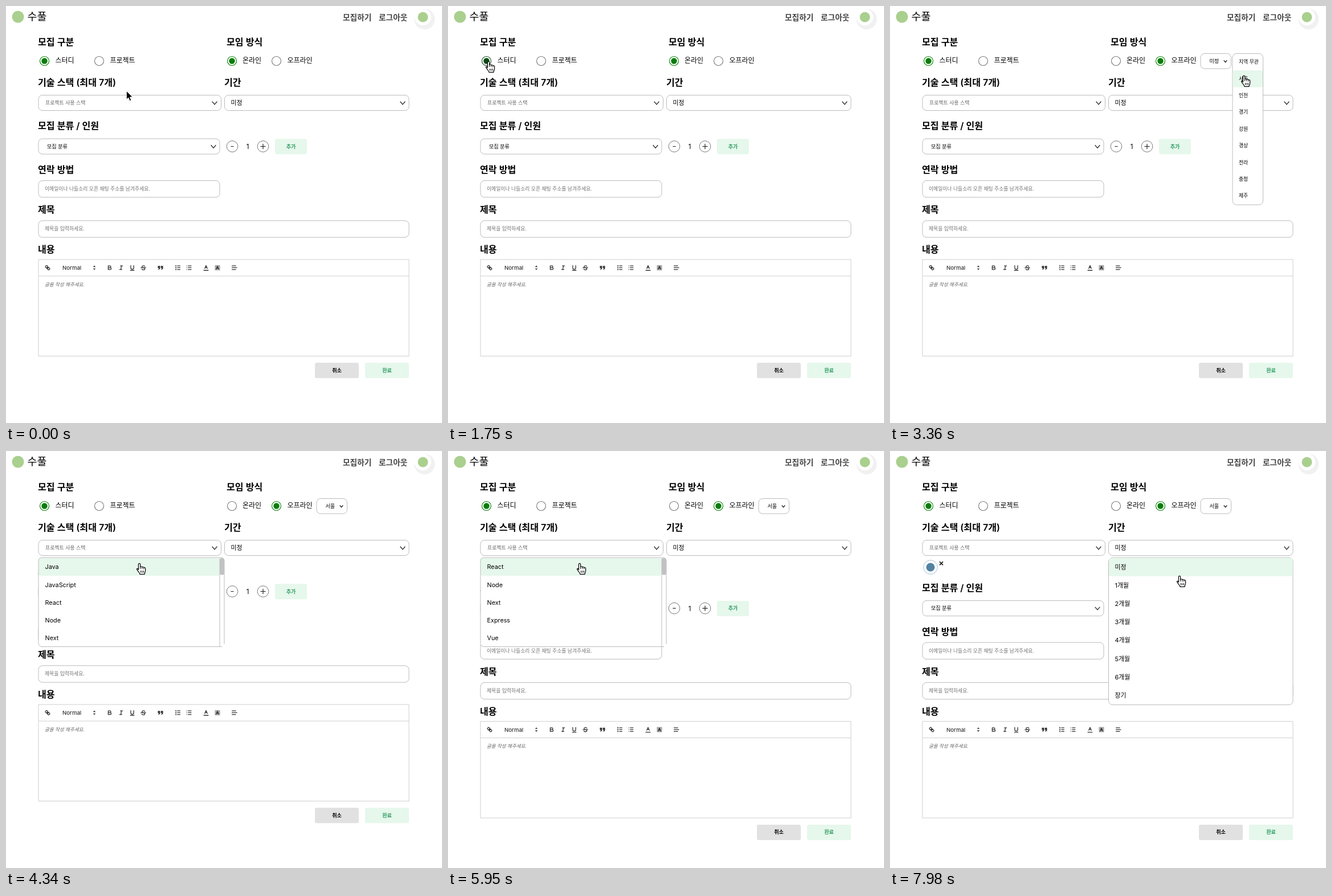
An HTML page that plays this animation: 765x732 px, repeating every 8 s.

```html
<!DOCTYPE html>
<html lang="ko">
<head>
<meta charset="utf-8">
<title>모집 글 작성</title>
<style>
  html, body { margin: 0; width: 100%; height: 100%; overflow: hidden; background: #fff; }
  svg { display: block; width: 765px; height: 732px; }
  text { font-family: Inter, "Noto Sans CJK KR", "Noto Sans CJK", sans-serif; white-space: pre; }
  .box { fill: #fff; stroke: #bbb; }
  .box.hover { stroke: #a6a6a6; }
  .line { fill: none; stroke: #222; stroke-width: 1.2; stroke-linecap: round; stroke-linejoin: round; }
  .icon { fill: none; stroke: #333; stroke-width: 2; stroke-linecap: round; stroke-linejoin: round; }
  .icon .solid { fill: #333; stroke: none; }
</style>
</head>
<body>
<svg id="stage" viewBox="0 0 765 732"></svg>
<script>
const LOOP = 8000, TICK = 70, SHIFT = 29.6;
const MINT = '#e6f7ec', GREEN = '#2f9e63', GRAY = '#737373';

// Moments at which the form changes.
const AT = {
  project: 630, study: 1470, offline: 2310,
  placeOpen: 2940, placePick: 3500,
  java: 4480, script: 5110, scriptGone: 7140, periodOpen: 7560
};
const STACK_OPEN = [[3850, 4480], [4760, 5110], [5460, 6300]];
const CARET_ON = [[3850, 4340], [4760, 5110], [5460, 5950]];

// Pointer path: time, x, y.
const PATH = [
  [0, 211, 149], [70, 211, 149], [490, 167, 99], [630, 168, 101], [770, 166, 101],
  [1260, 72, 98], [1470, 72, 97], [1750, 71, 97], [1890, 75, 97], [2030, 240, 86],
  [2170, 450, 92], [2240, 474, 99], [2310, 474, 99], [2520, 625, 105], [2660, 625, 105],
  [2870, 575, 97], [2940, 575, 97], [3360, 621, 122], [3500, 621, 122], [3570, 540, 158],
  [3710, 245, 171], [3850, 245, 171], [4200, 234, 197], [4480, 234, 197], [4690, 237, 172],
  [4830, 237, 172], [5040, 239, 194], [5110, 239, 194], [5250, 235, 171], [5460, 235, 171],
  [5740, 231, 197], [6020, 231, 197], [6230, 228, 168], [6300, 228, 168], [6720, 133, 197],
  [6860, 131, 196], [7140, 131, 196], [7350, 510, 154], [7560, 510, 156], [7980, 508, 219]
];

const STACKS = ['Java', 'JavaScript', 'React', 'Node', 'Next', 'Express', 'Vue'];
const PLACES = ['지역 무관', '서울', '인천', '경기', '강원', '경상', '전라', '충청', '제주'];
const PERIODS = ['미정', '1개월', '2개월', '3개월', '4개월', '5개월', '6개월', '장기'];
const RADIOS = { study: 67.5, project: 163.5, online: 396.5, offline: 474.5 };

// Drawing helpers; text is placed by its left edge and vertical centre.
const text = (x, cy, s, size, fill = '#000', weight = 400, extra = '') =>
  `<text x="${x}" y="${cy + size * .37}" font-size="${size}" fill="${fill}" font-weight="${weight}" ${extra}>${s}</text>`;
const head = (x, cy, s) => text(x, cy, s, 16.1, '#000', 600);
const rect = (x, y, w, h, r, attrs) => `<rect x="${x}" y="${y}" width="${w}" height="${h}" rx="${r}" ${attrs}/>`;
const box = (x, y, w, h, r = 7, id = '') => rect(x, y, w, h, r, `class="box" ${id && `id="${id}"`}`);
const disc = (x, y, r, attrs) => `<circle cx="${x}" cy="${y}" r="${r}" ${attrs}/>`;
const line = d => `<path class="line" d="${d}"/>`;
const chevron = (x, y, s = 4) => line(`M${x - s} ${y - s / 2}l${s} ${s * 1.2}l${s} ${-s * 1.2}`);
const group = (id, body) => `<g id="${id}">${body}</g>`;
const icon = (x, body) => `<g class="icon" transform="translate(${x - 5.85} 453.6) scale(.65)">${body}</g>`;
const stroke = d => `<path d="${d}"/>`;
const solid = d => `<path class="solid" d="${d}"/>`;
const cross = (x, y) => `<path d="M${x - 3} ${y - 3}l6 6m0 -6l-6 6" stroke="#000" stroke-width="1.6"/>`;
const button = (x, y, w, label, fill, ink) =>
  rect(x, y, w, 27, 3, `fill="${fill}"`) + text(x + w / 2, y + 13, label, 9.1, ink, 600, 'text-anchor="middle"');
const radio = name => group(name,
  disc(RADIOS[name], 96.5, 8, 'class="ring" fill="#fff" stroke-width="1.1"') +
  disc(RADIOS[name], 96.5, 5.2, 'class="dot"'));

function header() {
  return disc(21, 19, 10.5, 'fill="#a9d08e"') +
    text(37.5, 18.5, '수풀', 18.4, '#000', 500) +
    text(591, 20, '모집하기', 13.7, '#444', 600) +
    text(654, 20, '로그아웃', 13.7, '#444', 600) +
    disc(734.5, 23, 18, 'fill="#f1f1f1"') + disc(731.5, 19.5, 14.5, 'fill="#fff"') +
    disc(731.5, 19.5, 9, 'fill="#a9d08e"');
}

function topForm() {
  return head(56, 63, '모집 구분') + head(387, 63, '모임 방식') +
    Object.keys(RADIOS).map(radio).join('') +
    text(86.5, 96, '스터디', 12) + text(182.5, 96, '프로젝트', 12) +
    text(415, 96, '온라인', 12) + text(493.5, 96, '오프라인', 12) +
    group('place', box(545, 83.5, 53.5, 26.5, 7, 'placeBox') + text(560.5, 96.5, '미정', 9, '#000', 400, 'id="placeName"') + chevron(588.5, 97, 2.5)) +
    head(56, 134, '기술 스택 (최대 7개)') + head(383, 134, '기간') +
    box(57, 156.5, 320.5, 27, 7, 'stackBox') + text(69, 170, '프로젝트 사용 스택', 8.9, '#666') + chevron(366, 170) +
    rect(70, 165, 1, 11, 0, 'id="caret"') +
    box(383.5, 156.5, 323.5, 27, 7, 'periodBox') + text(394.5, 170, '미정', 10.9, '#000', 500) + chevron(696, 170);
}

function chips() {
  return group('javaChip', disc(71, 204, 12.3, 'fill="#fff" stroke="#a9c0d0"') +
      disc(71, 204, 7.5, 'fill="#5382a1"') + cross(90, 197.3)) +
    group('scriptChip', disc(112.8, 204, 12.3, 'fill="#fff" stroke="#f8efc0"') +
      rect(105, 196, 16.5, 16.5, 0, 'fill="#f7df1e"') + cross(130.7, 197.3));
}

function toolbar() {
  const rows = [4, 9, 14];
  const hatch = [3, 6, 9, 12, 15].map(v => `M${v} 3v12M3 ${v}h12`).join('');
  const letterA = 'M5.5 13L9 5l3.5 8M6.7 10.5h4.6';
  return icon(73, stroke('M7 11l4 -4M8.9 4.6a3.4 3.4 0 0 1 -4.3 4.3C3.2 7.5 2 6.4 4.2 4.2S7.5 3.2 8.9 4.6ZM13.4 9.1a3.4 3.4 0 0 0 -4.3 4.3c1.4 1.4 2.5 2.5 4.7 .4S14.8 10.5 13.4 9.1Z')) +
    text(99, 459.5, 'Normal', 9.6, '#333', 500) +
    icon(155, solid('M5.5 11h7L9 15ZM5.5 7h7L9 3Z')) +
    icon(182, stroke('M5 4h4.5a2.5 2.5 0 0 1 0 5H5ZM5 9h5.5a2.5 2.5 0 0 1 0 5H5Z')) +
    icon(202, stroke('M7 4h6M5 14h6M8 14L10 4')) +
    icon(221.5, stroke('M5 3v6a4 4 0 0 0 8 0V3M4 16h10')) +
    icon(241, stroke('M2.5 9h13M13 5.5C12 2.5 5.5 3 5.5 6C5.5 8 7.5 8.5 9 9C11 9.6 13 10 13 12C13 15.5 6 15.5 5 12.5')) +
    icon(271, solid('M2 4h6v6q0 4 -5 4v-2q2 0 2 -2h-3ZM10 4h6v6q0 4 -5 4v-2q2 0 2 -2h-3Z')) +
    icon(301.5, rows.map(y => stroke(`M8 ${y}h7M3 ${y - 1}h1v2`)).join('')) +
    icon(321, rows.map(y => stroke(`M7 ${y}h8M3 ${y}h.1`)).join('')) +
    icon(351, stroke('M5.5 11L9 3l3.5 8M6.7 8.8h4.6M3 16h12')) +
    icon(371, `<path d="${hatch}" stroke-width=".7"/>` + stroke(letterA)) +
    icon(400.5, stroke('M3 4h10M3 9h13M3 14h10'));
}

function lowerForm() {
  return head(56, 210.5, '모집 분류 / 인원') +
    box(57, 233, 318, 27) + text(72, 246.3, '모집 분류', 9.1, '#000', 500) + chevron(364, 246.5) +
    disc(397, 246.5, 9.8, 'fill="#fff" stroke="#777"') + line('M394.8 246.5h4.4') +
    text(424, 247, '1', 11.5, '#000', 400, 'text-anchor="middle"') +
    disc(451, 246.5, 9.8, 'fill="#fff" stroke="#777"') + line('M446.8 246.5h8.4m-4.2 -4.2v8.4') +
    button(472, 233.3, 56, '추가', MINT, GREEN) +
    head(56, 287, '연락 방법') +
    box(57, 306.5, 318, 29.3) + text(68, 321, '이메일이나 나들소리 오픈 채팅 주소를 남겨주세요.', 8.8, GRAY) +
    head(56, 357, '제목') +
    box(57, 376.8, 650, 29.3) + text(68, 391, '제목을 입력하세요.', 8.8, GRAY) +
    head(56, 427.5, '내용') +
    rect(57, 445, 650, 169.5, 0, 'fill="#fff" stroke="#d0d0d0"') +
    '<path d="M57 474h650" stroke="#d0d0d0"/>' + toolbar() +
    text(68, 488.5, '글을 작성 해주세요.', 8.5, '#666', 400, 'font-style="italic"') +
    button(542, 626.3, 77, '취소', '#e1e1e1', '#000') +
    button(630, 626.3, 77, '완료', MINT, GREEN);
}

function menus() {
  const stack = rect(57, 187, 326, 157, 7, 'fill="#fff"') +
    rect(57, 188, 317.5, 31, 3, `fill="${MINT}"`) +
    '<path d="M379 343.5H63a6 6 0 0 1 -6 -6V193a6 6 0 0 1 6 -6H377a6 6 0 0 1 6 6V339M375 188V343" fill="none" stroke="#bbb"/>' +
    rect(375, 188, 8, 29.5, 3.5, 'fill="#c1c1c1"') +
    [0, 1, 2, 3, 4].map(i => text(68.5, 203.5 + 31.1 * i, '', 10.8, '#000', 400, 'class="option"')).join('');
  const place = box(601, 83.5, 53.5, 265.5) + rect(601.5, 0, 52.5, 29.5, 4, `id="placeMark" fill="${MINT}"`) +
    PLACES.map((s, i) => text(612, 98 + 29.4 * i, s, 8.8)).join('');
  const period = box(383.5, 187, 323.5, 258.5) + rect(384, 0, 322.5, 32.2, 4, `id="periodMark" fill="${MINT}"`) +
    PERIODS.map((s, i) => text(394.5, 203.5 + 32.2 * i, s, 10.9)).join('');
  return group('stackMenu', stack) + group('placeMenu', place) + group('periodMenu', period);
}

function pointer() {
  const ink = 'stroke-linejoin="round" stroke-linecap="round"';
  const arrow = `<path d="M.3 .3V15.2L3.7 12L6.2 17.6L8.8 16.5L6.4 11H11Z" fill="#000" stroke="#fff" stroke-width="1" ${ink}/>`;
  const hand = `<path d="M-1.6 11.5V2C-1.6 -.2 1.6 -.2 1.6 2V7C1.8 5.3 4.6 5.3 4.8 7.2C5.2 6 7.6 6.2 7.8 8C8.3 7 10.6 7.3 10.6 9.2V13C10.6 15.5 9.2 16.5 9 19.3H1C.6 16.8 -2.2 14.5 -4 11.5C-5.4 9.2 -3.2 8.2 -1.6 11.5Z" fill="#fff" stroke="#000" stroke-width="1.2" ${ink}/>` +
    '<path d="M1.6 7V10M4.8 7.4V10.2M7.8 8.2V10.6M2.5 13v3.6M5 13v3.6M7.4 13v3.6" fill="none" stroke="#000" stroke-width="1"/>';
  return group('pointer', group('arrow', arrow) + group('hand', hand));
}

const stage = document.getElementById('stage');
stage.innerHTML = header() + topForm() + group('lower', lowerForm()) + chips() + menus() + pointer();

const el = {};
stage.querySelectorAll('[id]').forEach(n => el[n.id] = n);
const options = [...stage.querySelectorAll('.option')];
const show = (id, on) => el[id].style.display = on ? '' : 'none';
const within = (t, spans) => spans.some(([a, b]) => t >= a && t < b);

function pointerAt(t) {
  const i = PATH.findIndex(p => p[0] > t);
  if (i < 0) return PATH[PATH.length - 1].slice(1);
  const [t0, x0, y0] = PATH[i - 1], [t1, x1, y1] = PATH[i];
  const k = (t - t0) / (t1 - t0);
  return [x0 + (x1 - x0) * k, y0 + (y1 - y0) * k];
}

function paintRadio(name, on, hover) {
  const [ring, dot] = el[name].children;
  ring.setAttribute('stroke', on ? (hover ? '#0b4a14' : '#008000') : (hover ? '#444' : '#767676'));
  dot.setAttribute('fill', hover ? '#0b4a14' : '#0a7d0a');
  dot.style.display = on ? '' : 'none';
}

function draw(t) {
  const [x, y] = pointerAt(t);
  const over = (l, top, r, b) => x >= l && x <= r && y >= top && y <= b;
  const project = t >= AT.project && t < AT.study;
  const offline = t >= AT.offline;
  const placeOpen = t >= AT.placeOpen && t < AT.placePick;
  const stackOpen = within(t, STACK_OPEN);
  const periodOpen = t >= AT.periodOpen;
  const hasJava = t >= AT.java;
  const hasScript = t >= AT.script && t < AT.scriptGone;

  const chosen = { study: !project, project, online: !offline, offline };
  let hot = false;
  for (const name in RADIOS) {
    const hover = over(RADIOS[name] - 9, 87, RADIOS[name] + 9, 106);
    paintRadio(name, chosen[name], hover);
    hot = hot || hover;
  }

  const hovers = {
    placeBox: offline && over(545, 83, 599, 110),
    stackBox: over(57, 152, 378, 185),
    periodBox: over(383, 152, 707, 185)
  };
  for (const id in hovers) {
    el[id].classList.toggle('hover', hovers[id]);
    hot = hot || hovers[id];
  }

  const onPlace = placeOpen && over(601, 84, 655, 348);
  const onPeriod = periodOpen && over(383, 187, 707, 445);
  hot = hot || onPlace || onPeriod || (stackOpen && over(57, 187, 383, 344)) || (hasScript && over(126, 192, 136, 203));

  show('place', offline);
  el.placeName.textContent = t < AT.placePick ? '미정' : '서울';
  show('placeMenu', placeOpen);
  show('placeMark', onPlace);
  el.placeMark.setAttribute('y', 83.5 + 29.4 * Math.floor((y - 83.5) / 29.4));
  show('periodMenu', periodOpen);
  el.periodMark.setAttribute('y', 187.5 + 32.2 * (onPeriod ? Math.floor((y - 187) / 32.2) : 0));

  show('stackMenu', stackOpen);
  const skip = hasJava + hasScript;
  options.forEach((n, i) => n.textContent = STACKS[i + skip]);
  show('caret', within(t, CARET_ON));
  show('javaChip', hasJava);
  show('scriptChip', hasScript);
  el.lower.setAttribute('transform', `translate(0 ${hasJava ? SHIFT : 0})`);

  el.pointer.setAttribute('transform', `translate(${x} ${y})`);
  show('hand', hot);
  show('arrow', !hot);
}

const start = performance.now();
function frame() {
  const t = (performance.now() - start) % LOOP;
  draw(Math.floor(t / TICK) * TICK);
  requestAnimationFrame(frame);
}
frame();
</script>
</body>
</html>
```
